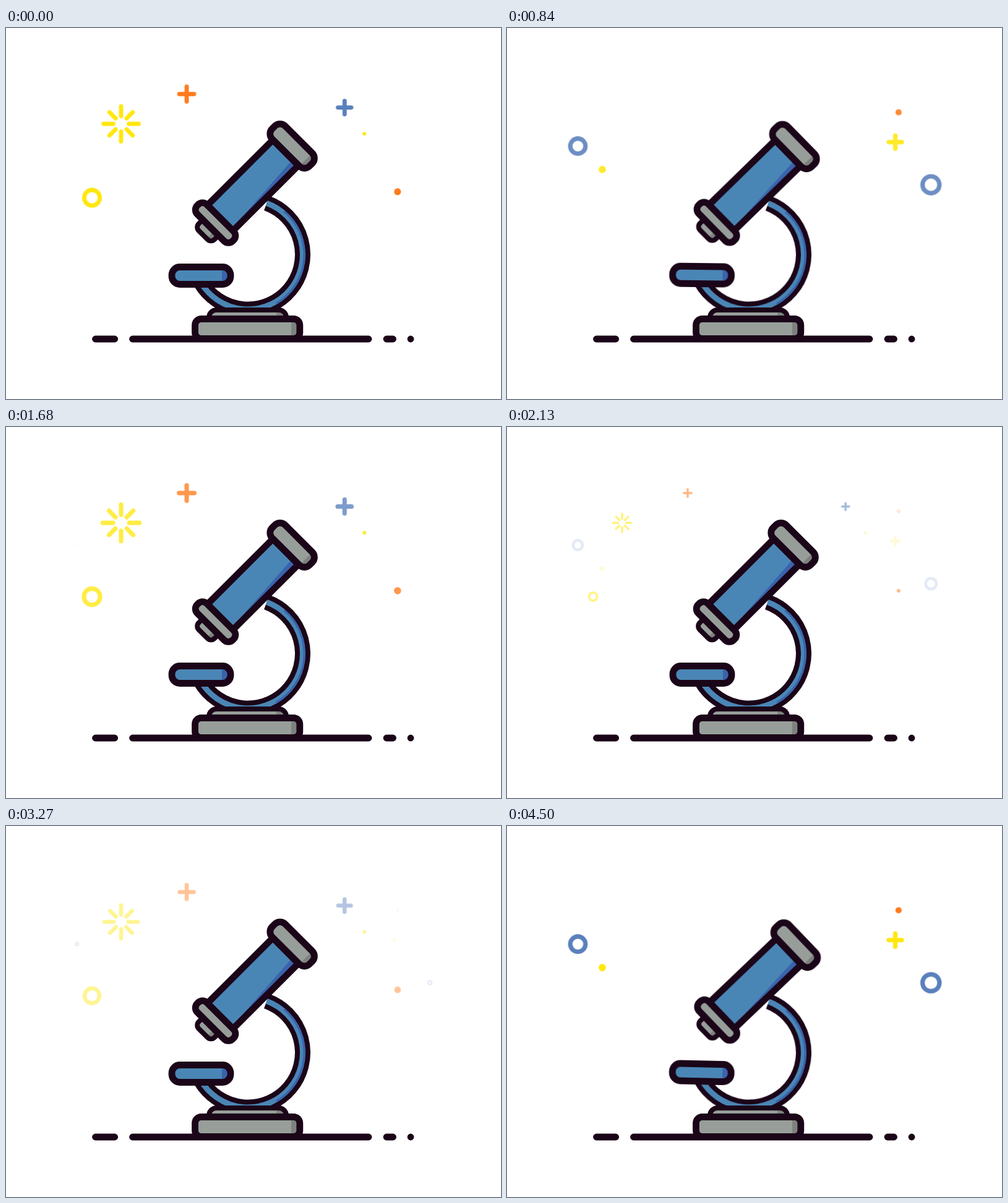
Recreate the animation shown at these times as an HTML page. Size 800 px wide and 600 px high, loop 4.53 s.

```html
<!DOCTYPE html>
<html lang="en">
<head>
<meta charset="utf-8">
<title>Microscope</title>
<style>
  html, body { margin: 0; width: 100%; height: 100%; overflow: hidden; background: #fff; }
  svg { display: block; width: 100vw; height: 100vh; }

  :root {
    --loop: 4530ms linear infinite;
    --fall: cubic-bezier(.333, .667, .667, 1);
    --rise: cubic-bezier(.333, 0, .667, .333);
  }

  .ink { stroke: #1b0518; stroke-linecap: round; stroke-linejoin: round; }
  .w11 { stroke-width: 10.8; }
  .w8 { stroke-width: 8; }
  .none { fill: none; }
  .gray { fill: #979e99; }
  .gray-dark { fill: #7d827e; }
  .blue { fill: #4a86b5; }
  .blue-dark { fill: #3a63ae; }

  .yellow { --c: #ffe600; }
  .orange { --c: #ff7411; }
  .sky { --c: #5179b9; }
  .line { fill: none; stroke: var(--c); stroke-width: 7.2; stroke-linecap: round; }
  .dot { fill: var(--c); }

  .rock { transform-origin: 391px 366.5px; animation: rock var(--loop); }
  .a { animation: size-a var(--loop), fade-a var(--loop); }
  .b { animation: size-b var(--loop), fade-b var(--loop); }

  @keyframes rock {
    0%, .662% { transform: rotate(0deg); animation-timing-function: ease-in-out; }
    4.636% { transform: rotate(2.35deg); animation-timing-function: ease-in-out; }
    12.583% { transform: rotate(-4deg); animation-timing-function: ease-in-out; }
    20.53% { transform: rotate(1.35deg); animation-timing-function: ease-in-out; }
    36.424%, 80.132% { transform: rotate(0deg); animation-timing-function: ease-in-out; }
    84.106% { transform: rotate(2.35deg); animation-timing-function: ease-in-out; }
    92.053% { transform: rotate(-4deg); animation-timing-function: ease-in-out; }
    100% { transform: rotate(1.35deg); }
  }
  @keyframes size-a {
    0% { transform: scale(.945); }
    .662%, 40.397%, 80.132% { transform: scale(1); animation-timing-function: var(--fall); }
    20.53%, 60.265% { transform: scale(.12); animation-timing-function: var(--rise); }
    100% { transform: scale(.12); }
  }
  @keyframes fade-a {
    0% { opacity: .945; }
    .662%, 40.397%, 80.132% { opacity: 1; animation-timing-function: ease-out; }
    20.53%, 60.265% { opacity: 0; animation-timing-function: ease-in; }
    100% { opacity: 0; }
  }
  @keyframes size-b {
    0% { transform: scale(.12); }
    .662%, 40.397%, 80.132% { transform: scale(.12); animation-timing-function: var(--rise); }
    20.53%, 60.265% { transform: scale(1); animation-timing-function: var(--fall); }
    100% { transform: scale(1); }
  }
  @keyframes fade-b {
    0% { opacity: 0; }
    .662%, 40.397%, 80.132% { opacity: 0; animation-timing-function: ease-in; }
    20.53%, 60.265% { opacity: 1; animation-timing-function: ease-out; }
    100% { opacity: 1; }
  }
</style>
</head>
<body>
<svg viewBox="0 0 800 600">
  <!-- sparkles, first set -->
  <g transform="translate(186 155)"><g class="a yellow">
    <path class="line" d="M0-13.2V-30M0 13.2V30M-13.2 0H-30M13.2 0H30"/>
    <path class="line" transform="rotate(45)" d="M0-13.2V-28M0 13.2V28M-13.2 0H-28M13.2 0H28"/>
  </g></g>
  <g transform="translate(292 106.8)"><path class="a orange line" d="M-12.7 0H12.7M0-12.7V12.7"/></g>
  <g transform="translate(547.2 128.6)"><path class="a sky line" d="M-11.4 0H11.4M0-11.4V11.4"/></g>
  <g transform="translate(579.2 171)"><circle class="a yellow dot" r="3.2"/></g>
  <g transform="translate(632.8 264.8)"><circle class="a orange dot" r="5.9"/></g>
  <g transform="translate(139 274.5)"><circle class="a yellow line" r="13.3"/></g>

  <!-- sparkles, second set -->
  <g transform="translate(114.5 191)"><circle class="b sky line" r="12.3"/></g>
  <g transform="translate(685.2 253.5)"><circle class="b sky line" r="13.7"/></g>
  <g transform="translate(154 229)"><circle class="b yellow dot" r="5.9"/></g>
  <g transform="translate(632.8 136.3)"><circle class="b orange dot" r="5.1"/></g>
  <g transform="translate(627.5 184.5)"><path class="b yellow line" d="M-10.7 0H10.7M0-10.7V10.7"/></g>

  <g class="rock">
    <!-- arm -->
    <g transform="translate(391 366.5)" fill="none">
      <path id="arm" stroke="#1b0518" stroke-width="25" d="M30.3-83.2A88.5 88.5 0 1 1-76.6 44.3"/>
      <path stroke="#4a86b5" stroke-width="9" d="M30.3-83.2A88.5 88.5 0 1 1-76.6 44.3"/>
      <path stroke="#3a63ae" stroke-width="3.2" d="M58.5-70A91.3 91.3 0 0 1 45.6 79"/>
    </g>

    <!-- stage plate -->
    <rect class="blue" x="268" y="386.5" width="95" height="28" rx="13"/>
    <path class="blue-dark" d="M349 388h10v25h-10z"/>
    <rect class="ink w11 none" x="268" y="386.5" width="95" height="28" rx="13"/>

    <!-- tube, drawn upright -->
    <g transform="translate(326.75 326.75) rotate(45)">
      <rect class="blue" x="-29.2" y="-177" width="58.4" height="150"/>
      <path class="blue-dark" d="M16-174H26V-45H24.5Z"/>
      <rect class="ink w11 none" x="-29.2" y="-177" width="58.4" height="150"/>

      <rect class="gray" x="-18" y="-8" width="36" height="19.5" rx="8"/>
      <path class="gray-dark" d="M8-4H16V9H8Z"/>
      <rect class="ink w8 none" x="-18" y="-8" width="36" height="19.5" rx="8"/>

      <rect class="gray ink w11" x="-40.6" y="-27.6" width="81.2" height="22" rx="10"/>

      <rect class="gray" x="-42.7" y="-206.9" width="85.4" height="29.6" rx="11.7"/>
      <path class="gray-dark" d="M31-204H39V-180H31Z"/>
      <rect class="ink w11 none" x="-42.7" y="-206.9" width="85.4" height="29.6" rx="11.7"/>
    </g>
  </g>

  <!-- base -->
  <path class="gray" d="M328 472V468A12 12 0 0 1 340 456H441A12 12 0 0 1 453 468V472Z"/>
  <path class="gray-dark" d="M437 458H446L451 468H437Z"/>
  <path class="ink w8 none" d="M328 472V468A12 12 0 0 1 340 456H441A12 12 0 0 1 453 468V472"/>
  <rect class="gray" x="305.5" y="470.5" width="169.3" height="32" rx="10"/>
  <path class="gray-dark" d="M461 473h10v27h-10z"/>
  <rect class="ink w11 none" x="305.5" y="470.5" width="169.3" height="32" rx="10"/>

  <!-- ground -->
  <path class="ink w11 none" d="M144.5 503H175.7M204.5 503H586M615 503H625.5M654 503h.01"/>
</svg>
</body>
</html>
```
